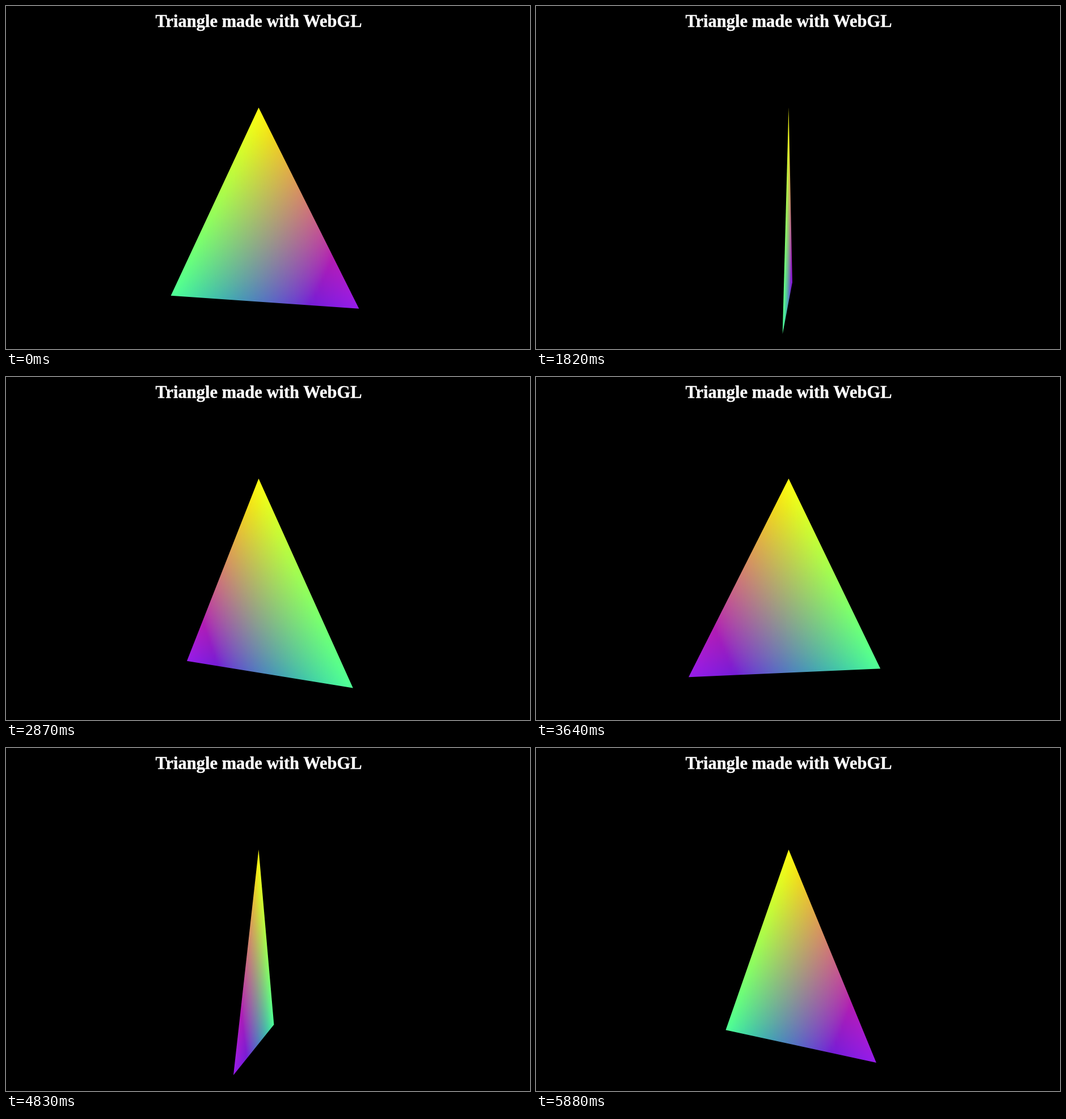
Recreate the animation shown at these times as an HTML page with a canvas. Size 924 by 606 pixels, loop 5.95 s.

```html
<!DOCTYPE html>
<html lang="en">
<head>
<meta charset="utf-8">
<title>Triangle made with WebGL</title>
<style>
  html, body { margin: 0; width: 100%; height: 100%; overflow: hidden; background: #000; }
  canvas, svg { position: absolute; left: 0; top: 0; }
  text {
    font: bold 30.5px "Liberation Serif", "Times New Roman", serif;
    fill: #fff; stroke: #fff; stroke-width: 0.4; text-anchor: middle;
  }
</style>
</head>
<body>
<canvas width="924" height="606"></canvas>
<svg width="924" height="606"><text x="445.5" y="37">Triangle made with WebGL</text></svg>
<script>
const ctx = document.querySelector('canvas').getContext('2d');
const STEP = 70, STEPS = 85;
const CX = 445.5, CY = 351, SIZE = 171.4, DEPTH = 0.25;
const YELLOW = [1, 1, 0], GREEN = [0.1, 1, 0.6], PURPLE = [0.7, 0, 1];
const STOPS = 8;

// Display profile, applied in linear light
const PROFILE = [[0.893, 0.107, -0.1], [-0.04, 1.05, -0.025], [-0.025, 0.03, 0.84]];
const DARKEST = [0, 0.0116, 0.006];

// [step, degrees]: a nearly steady spin with small hitches
const SPIN = [[0, 15.5], [16, -46.9], [26, -87.3], [41, -147], [52, -190],
              [54, -199.2], [63, -235.3], [69, -258.7], [84, -318.9]];

function angleAt(step) {
  const i = Math.max(1, SPIN.findIndex(key => key[0] >= step));
  const [s0, a0] = SPIN[i - 1], [s1, a1] = SPIN[i];
  return (a0 + (a1 - a0) * (step - s0) / (s1 - s0)) * Math.PI / 180;
}

const mix = (a, b, k) => a.map((v, i) => v + (b[i] - v) * k);

function displayed(color) {
  const light = color.map(v => v ** 2.2);
  const rgb = PROFILE.map((row, i) => {
    const sum = row.reduce((total, k, j) => total + k * light[j], 0);
    const value = Math.min(1, Math.max(DARKEST[i], sum));
    return Math.round(255 * (1.055 * value ** (1 / 2.4) - 0.055));
  });
  return `rgb(${rgb})`;
}

function draw(step) {
  const angle = angleAt(step), cos = Math.cos(angle), sin = Math.sin(angle);
  const project = (u, v) => {
    const scale = SIZE / (1 - DEPTH * u * sin);
    return [CX + u * cos * scale, CY - v * scale];
  };
  const corners = [project(0, 1), project(-1, -1), project(1, -1)];
  const xs = corners.map(p => p[0]);

  ctx.fillStyle = '#000';
  ctx.fillRect(0, 0, 924, 606);
  ctx.save();
  ctx.beginPath();
  corners.forEach(p => ctx.lineTo(...p));
  ctx.closePath();
  ctx.clip();

  // Every screen column has one depth, so its base colours blend linearly.
  for (let x = Math.floor(Math.min(...xs)); x < Math.max(...xs); x++) {
    const sx = (x + 0.5 - CX) / SIZE;
    const u = Math.max(-1, Math.min(1, sx / (cos + DEPTH * sx * sin)));
    const side = Math.abs(u);
    const top = project(u, 1 - 2 * side)[1], bottom = project(u, -1)[1];
    const upper = mix(YELLOW, u < 0 ? GREEN : PURPLE, side);
    const lower = mix(GREEN, PURPLE, (u + 1) / 2);
    const blend = ctx.createLinearGradient(0, top, 0, bottom + 0.01);
    for (let i = 0; i <= STOPS; i++) {
      blend.addColorStop(i / STOPS, displayed(mix(upper, lower, i / STOPS)));
    }
    ctx.fillStyle = blend;
    ctx.fillRect(x, 170, 1, 420);
  }
  ctx.restore();
}

const start = performance.now();
let shown = -1;
function tick() {
  const step = Math.floor((performance.now() - start) / STEP) % STEPS;
  if (step !== shown) draw(shown = step);
  requestAnimationFrame(tick);
}
tick();
</script>
</body>
</html>
```
